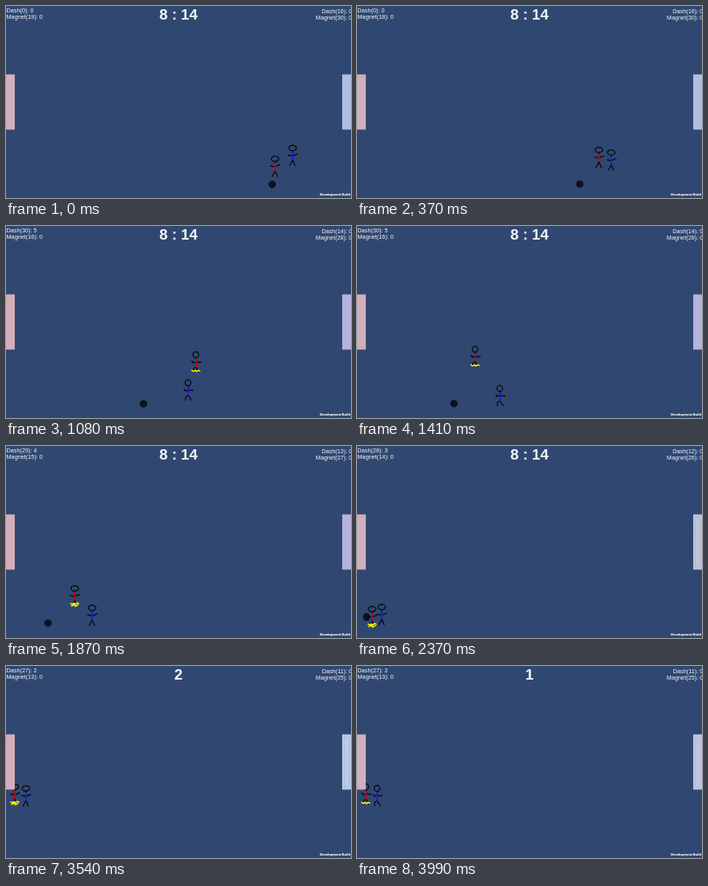
These frames come from a looping animation (432x240 px, 4040 ms). An HTML page:

```html
<!DOCTYPE html>
<html lang="en">
<head>
<meta charset="utf-8">
<title>Stick football</title>
<style>
  html, body { margin: 0; width: 100%; height: 100%; overflow: hidden; background: #304871; }
  svg { display: block; width: 100vw; height: 100vh; }
  text { font-family: "Liberation Sans", Arial, sans-serif; fill: #f4f6fa; }
  .stat { font-size: 7.3px; }
  .right { text-anchor: end; }
  .score { font-size: 18.8px; font-weight: bold; text-anchor: middle; }
  .build { font-size: 4.2px; font-weight: bold; text-anchor: end; fill: #fff; stroke: #fff; stroke-width: .12; }
  .player { fill: none; stroke-width: 1.4; stroke-linecap: round; stroke-linejoin: round; }
  .ink { stroke: #080b14; }
  .torso { stroke-width: 1.9; }
  .inner { fill: none; stroke-width: .9; }
</style>
</head>
<body>
<svg viewBox="0 0 432 240">
  <rect width="432" height="240" fill="#304871"/>
  <circle id="ball" r="4.7" fill="#0e1220"/>
  <g id="blue" class="player">
    <path class="limbs ink"/>
    <path class="torso" stroke="#1c1ed0"/>
    <ellipse class="head ink"/>
  </g>
  <g id="red" class="player">
    <path class="limbs ink"/>
    <path class="torso" stroke="#b8081c"/>
    <ellipse class="head ink"/>
    <path id="spark" stroke="#f2f012" stroke-width="1.6"/>
  </g>
  <rect id="goalLeft" y="85.5" width="11" height="69" fill="#d3aeb8"/>
  <rect id="innerLeft" class="inner" x="3" y="91" width="4.5" height="58" stroke="#b4c0dc"/>
  <rect id="goalRight" x="421" y="85.5" width="11" height="69"/>
  <rect id="innerRight" class="inner" x="423.5" y="89" width="6.5" height="62" stroke="#9db0d2" stroke-dasharray="3 1.5"/>
  <text id="dashLeft" class="stat" x=".5" y="7.8"/>
  <text id="magnetLeft" class="stat" x=".5" y="16"/>
  <text id="dashRight" class="stat right" x="433.3" y="8.7"/>
  <text id="magnetRight" class="stat right" x="433.3" y="16.8"/>
  <text id="score" class="score" x="216" y="17.3"/>
  <text class="build" x="431" y="236.5">Development Build</text>
</svg>
<script>
const LOOP = 4040, GOAL = 2700, DASH = 1080, STEP = 145;
const RATE = 2 / 1000; // game seconds per millisecond
const $ = id => document.getElementById(id);

// [time, x, y]; players are placed by the centre of the head
const paths = {
  red: [[0, 337, 191], [750, 268, 168.5], [DASH, 238, 161], [1410, 148, 154], [2370, 19, 204], [GOAL, 11, 151]],
  blue: [[0, 359, 177.5], [750, 277, 189], [1410, 179, 203], [2370, 31, 201.5], [GOAL, 25, 153]],
  ball: [[0, 333.5, 223], [750, 223, 222.5], [1410, 121.5, 222], [2130, 14, 221], [2370, 12, 214], [GOAL, 8, 155]]
};

const poses = [
  { head: [4.7, 3.3], torso: "M0 5.5V14.5", limbs: "M0 3.5V6M-5.5 9L0 10L6 7.5M0 15L-3.5 22M0 15L3 22",
    spark: "M-5 19L-3 20L-1 18.5L1 20L3 18L5 19M-4 22L-1 20.5L1 22.5L4 20.5" },
  { head: [3.6, 3.7], torso: "M.5 5.5V15", limbs: "M.5 3.5V6M-5 7.5L-3.5 10L.5 9L6.5 9.5M.5 15.5L-3 17.5V22M.5 15.5L4 21.5",
    spark: "M-5 19.5L-3 21L-1 19.5L1 21L3 19.5L5 20.5" }
];

// [start, right goal colour, left outline, right outline]
const shades = [
  [0, "#b2bee0", .8, .4], [375, "#c2d1e8", .6, .9], [1080, "#b5b2dc", .2, 0], [1890, "#c0c4d8", .9, .9],
  [2600, "#aebee0", 0, 0], [3185, "#bccbe8", 0, .9], [3765, "#c0c3e4", .9, .6]
];

function along(path, t) {
  const next = path.findIndex(p => p[0] > t);
  if (next < 0) return path[path.length - 1].slice(1);
  const [a, b] = [path[next - 1], path[next]];
  const k = (t - a[0]) / (b[0] - a[0]);
  return [a[1] + (b[1] - a[1]) * k, a[2] + (b[2] - a[2]) * k];
}

function place(id, t) {
  $(id).setAttribute("transform", `translate(${along(paths[id], t)})`);
}

function drawPlayer(id, t) {
  const pose = poses[Math.floor(t / STEP) % 2];
  const part = name => $(id).querySelector(name);
  place(id, t);
  part(".torso").setAttribute("d", pose.torso);
  part(".limbs").setAttribute("d", pose.limbs);
  part(".head").setAttribute("rx", pose.head[0]);
  part(".head").setAttribute("ry", pose.head[1]);
  if (id === "red") $("spark").setAttribute("d", pose.spark);
}

function show(id, visible) {
  $(id).setAttribute("visibility", visible ? "visible" : "hidden");
}

function drawTexts(t) {
  const clock = Math.min(t, GOAL);
  const left = (start, since = 0) => Math.ceil(start - (clock - since) * RATE);
  const dashed = t >= DASH;
  $("dashLeft").textContent = dashed ? `Dash(${left(30, DASH)}): ${left(5, DASH)}` : "Dash(0): 0";
  $("magnetLeft").textContent = `Magnet(${left(18.1)}): 0`;
  $("dashRight").textContent = `Dash(${left(15.9)}): 0`;
  $("magnetRight").textContent = `Magnet(${left(29.9)}): 0`;
  $("score").textContent = t < GOAL ? "8 : 14" : 3 - Math.floor((t - GOAL) * RATE);
}

function drawGoals(t) {
  const [, color, outlineLeft, outlineRight] = shades.filter(s => s[0] <= t).pop();
  $("goalRight").setAttribute("fill", color);
  $("innerLeft").setAttribute("opacity", outlineLeft);
  $("innerRight").setAttribute("opacity", outlineRight);
}

function draw(t) {
  drawPlayer("red", t);
  drawPlayer("blue", t);
  place("ball", t);
  show("ball", t < GOAL);
  show("spark", t >= DASH);
  drawTexts(t);
  drawGoals(t);
}

const begin = performance.now();
function tick() {
  draw((performance.now() - begin) % LOOP);
  requestAnimationFrame(tick);
}
tick();
</script>
</body>
</html>
```
